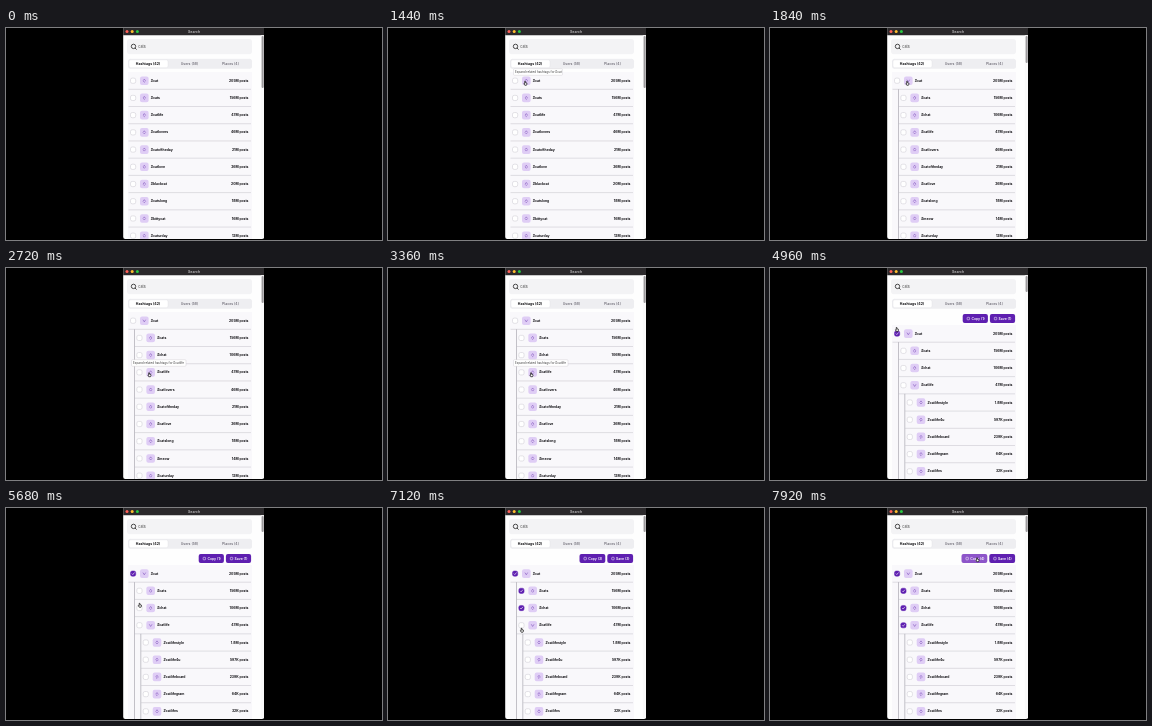
An HTML page with a canvas for the animation above (8 s loop, 376 by 212 pixels).

```html
<!DOCTYPE html>
<html lang="en">
<head>
<meta charset="utf-8">
<style>
html, body { margin: 0; width: 100%; height: 100%; overflow: hidden; background: #000; }
canvas { display: block; width: 376px; height: 212px; }
</style>
</head>
<body>
<canvas></canvas>
<script>
const canvas = document.querySelector('canvas');
const c = canvas.getContext('2d');
const dpr = window.devicePixelRatio || 1;
canvas.width = 376 * dpr;
canvas.height = 212 * dpr;
c.scale(dpr, dpr);

const LOOP = 8000, STEP = 17.22, TOP = 52.7, INDENT = 6.35;
const PURPLE = '#5e1fb0', GLYPH = '#8254bd', INK = '#111014';
const T = { open: 1840, openSub: 3560, pick: [4680, 5880, 6300, 7200], hover: 7680 };

const parse = (s, level) => s.split(',').map(p => {
  const [name, count] = p.split(' ');
  return { name: '#' + name, count: count + ' posts', level };
});
const start = parse('cat 205M,cats 156M,catlife 47M,catlovers 46M,catoftheday 21M,catlove 26M,blackcat 20M,catslong 18M,kittycat 16M,caturday 12M', 0);
const related = parse('cats 156M,chat 106M,catlife 47M,catlovers 46M,catoftheday 21M,catlove 26M,catslong 18M,meow 14M,caturday 12M', 1);
const sub = parse('catlifestyle 1.8M,catlife4u 597K,catlifeboard 239K,catlifegram 64K,catlifes 32K,catlifestyling 22K', 2);

// time, x, y
const path = [
  [800, 134, 61], [1040, 137.5, 55], [2240, 137.5, 55], [2720, 143.5, 106.5],
  [3680, 143.5, 106.5], [4160, 126.5, 58], [4880, 126.5, 58], [5360, 134, 101],
  [5600, 134, 99], [5680, 134, 97], [5840, 134, 85.5], [5960, 134, 85.5],
  [6240, 134, 102.5], [6400, 134, 102.5], [6800, 134, 122], [7240, 134, 122], [7720, 207.5, 51.5]
];

const clamp = v => Math.max(0, Math.min(1, v));

function box(x, y, w, h, r, fill, stroke, width = 0.6) {
  c.beginPath();
  c.roundRect(x, y, w, h, r);
  if (fill) { c.fillStyle = fill; c.fill(); }
  if (stroke) { c.strokeStyle = stroke; c.lineWidth = width; c.stroke(); }
}

function line(points, color, width) {
  c.beginPath();
  points.forEach(([x, y]) => c.lineTo(x, y));
  c.strokeStyle = color;
  c.lineWidth = width;
  c.stroke();
}

function disc(x, y, r, fill, stroke, width) {
  box(x - r, y - r, 2 * r, 2 * r, r, fill, stroke, width);
}

// Draws a label and returns its width.
function text(s, x, y, size, color = INK, weight = 700, align = 'left') {
  c.save();
  c.translate(x, y);
  c.scale(size / 20, size / 20);
  c.font = weight + ' 20px Inter, sans-serif';
  c.textAlign = align;
  c.textBaseline = 'middle';
  c.fillStyle = color;
  c.fillText(s, 0, 0);
  const width = c.measureText(s).width * size / 20;
  c.restore();
  return width;
}

function frame() {
  box(117.2, 0, 140.8, 211, [0, 0, 2, 2], '#fefefe');
  box(117.2, 0, 140.8, 7.2, 0, '#2b292b');
  ['#ff5f57', '#febc2e', '#28c840'].forEach((col, i) => disc(121 + i * 5.2, 3.4, 1.5, col));
  text('Search', 188, 3.7, 3.6, '#bbb9bb', 600, 'center');
}

function header() {
  box(121, 11, 125, 15.3, 3, '#f3f3f5');
  disc(127.5, 18.4, 2.2, null, '#222', 0.8);
  line([[129, 20], [130.6, 21.6]], '#222', 0.8);
  text('cats', 132.3, 18.9, 3.7, '#444', 400);
  box(122, 30.8, 124, 10, 2.5, '#eeeef1');
  box(123, 31.8, 39, 8, 1.8, '#fff', '#dedee3', 0.4);
  text('Hashtags (42)', 142, 36, 3.5, INK, 700, 'center');
  text('Users (58)', 183.5, 36, 3.5, '#66636e', 500, 'center');
  text('Places (4)', 224.5, 36, 3.5, '#66636e', 500, 'center');
}

function checkbox(x, y, on) {
  box(x - 2.6, y - 2.6, 5.2, 5.2, 1.7, on ? PURPLE : '#fff', on ? PURPLE : '#c9c6cf', 0.5);
  if (on) line([[x - 1.3, y], [x - 0.3, y + 1], [x + 1.4, y - 1.1]], '#fff', 0.6);
}

function icon(x, y, open) {
  box(x - 4.3, y - 4.3, 8.6, 8.6, 2, '#dfcdf5');
  if (open) {
    line([[x - 1.4, y - 1], [x, y + 1.2], [x + 1.4, y - 1]], GLYPH, 0.6);
  } else {
    line([[x - 1.2, y], [x, y - 1.6], [x + 1.2, y]], GLYPH, 0.6);
    line([[x - 1.2, y + 0.3], [x, y + 1.5], [x + 1.2, y + 0.3]], GLYPH, 0.6);
  }
}

function list(t) {
  const open = t >= T.open, openSub = t >= T.openSub;
  const rows = !open ? start
    : [start[0], ...related.slice(0, 3), ...(openSub ? sub : related.slice(3))];
  const shift = t >= T.pick[0] ? 12.9 : 0;
  const top = TOP + shift;
  c.save();
  c.beginPath();
  c.rect(117.2, 43, 137.8, 168);
  c.clip();
  box(122, top - 8.6, 124, 180, 0, '#f9f8fb');
  rows.forEach((row, i) => {
    const y = top + i * STEP, dx = row.level * INDENT;
    line([[122.5 + dx, y + 8.6], [245, y + 8.6]], '#c6c4cc', 0.55);
    checkbox(127.1 + dx, y, i < 4 && t >= T.pick[i]);
    icon(138.3 + dx, y, (i === 0 && open) || (i === 3 && openSub));
    text(row.name, 144.8 + dx, y + 0.1, 3.35);
    text(row.count, 242.5, y + 0.1, 3.35, INK, 700, 'right');
  });
  if (open) line([[128.5, top + 8.6], [128.5, 212]], '#9d9aa4', 0.6);
  if (openSub) line([[134.8, top + 3 * STEP + 8.6], [134.8, 212]], '#9d9aa4', 0.6);
  c.restore();
  box(254.8, 7.2, 3.2, 203, 0, '#f9f9f9');
  box(255.6, 8, 2.1, openSub ? 16 : open ? 27 : 52, 1, '#9c9a9c');
}

// Places a button by its right edge and returns its left edge.
function button(right, label, hover) {
  const w = (label.includes('1') ? 25.2 : 25.8), x = right - w;
  box(x, 46, w, 9, 2, hover ? '#8d55c9' : PURPLE);
  box(x + 4.4, 49.3, 2.5, 2.5, 0.6, null, '#fff', 0.5);
  text(label, x + 8.7, 50.6, 3.4, '#fff', 600);
  return x;
}

function buttons(t) {
  const n = T.pick.filter(p => t >= p).length;
  if (!n) return;
  const left = button(245.1, `Save (${n})`);
  button(left - 2, `Copy (${n})`, t >= T.hover);
}

function tooltip(t, from, to, y, name, width) {
  c.globalAlpha = clamp((t - from) / 240) * clamp((to - t) / 160);
  box(125.5, y - 3.3, width, 6.6, 1, '#fff', '#c9c7cf', 0.4);
  text('Expand related hashtags for ' + name, 127, y + 0.1, 2.95, '#555', 500);
  c.globalAlpha = 1;
}

function cursor(t) {
  if (t < path[0][0]) return;
  let i = path.findIndex(p => p[0] > t);
  if (i < 0) i = path.length;
  const a = path[i - 1], b = path[i] || a;
  const u = b === a ? 0 : (t - a[0]) / (b[0] - a[0]);
  const e = u * u * (3 - 2 * u);
  c.save();
  c.translate(a[1] + (b[1] - a[1]) * e, a[2] + (b[2] - a[2]) * e + 0.3);
  c.scale(0.8, 0.8);
  c.beginPath();
  [[-1, -2.5], [-0.2, -2.5], [0, -0.8], [1.7, -0.3], [1.8, 1], [1.2, 2.4], [-0.9, 2.4], [-2, 0.4], [-1, 0.4]]
    .forEach(([x, y]) => c.lineTo(x, y));
  c.closePath();
  c.fillStyle = '#fff';
  c.fill();
  c.strokeStyle = '#111';
  c.lineWidth = 0.9;
  c.lineJoin = 'round';
  c.stroke();
  c.restore();
}

function draw(now) {
  const t = now % LOOP;
  c.fillStyle = '#000';
  c.fillRect(0, 0, 376, 212);
  frame();
  header();
  list(t);
  buttons(t);
  tooltip(t, 1120, 1840, 44, '#cat', 49);
  tooltip(t, 2480, 3560, 95, '#catlife', 54.5);
  cursor(t);
}

let begin;
function tick(now) {
  begin ??= now;
  draw(now - begin);
  requestAnimationFrame(tick);
}
draw(0);
requestAnimationFrame(tick);
</script>
</body>
</html>
```
